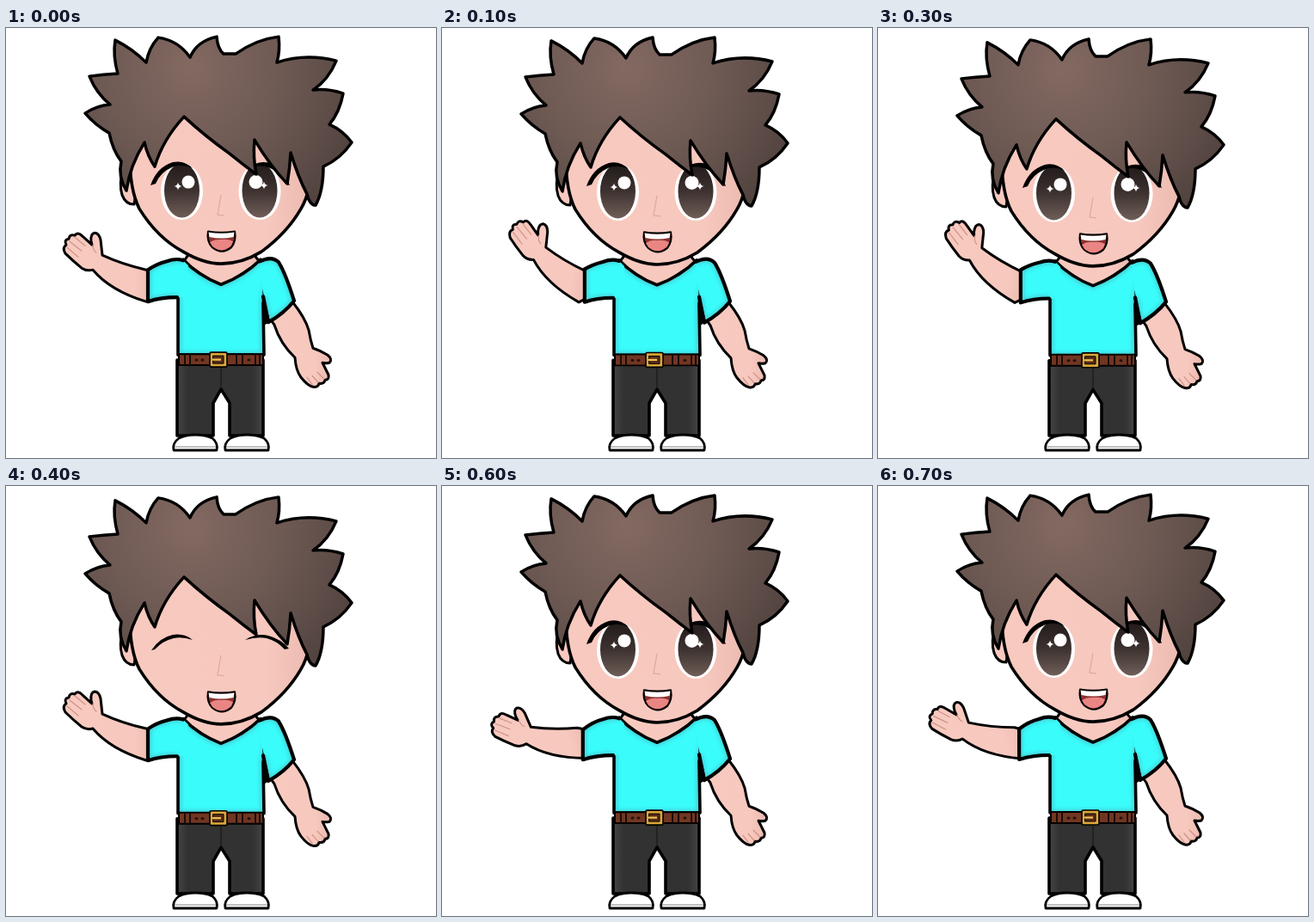
An HTML page that plays this animation: 500x500 px, repeating every 0.8 s.

```html
<!DOCTYPE html>
<html lang="en">
<head>
<meta charset="utf-8">
<title>Waving boy</title>
<style>
  html, body { margin: 0; width: 100%; height: 100%; overflow: hidden; background: #fff; }
  svg { display: block; width: 100vw; height: 100vh; }
  .line { stroke: #000; stroke-linejoin: round; stroke-linecap: round; }
  .skin { fill: url(#skin); stroke-width: 3; }
  .crease { fill: none; stroke: #cf9388; stroke-width: 1.2; stroke-linecap: round; }
  .cloth { fill: #3afcfb; }
  .shade { fill: none; stroke: #4cc3cb; stroke-width: 8; opacity: .75; filter: url(#soft); }
</style>
</head>
<body>
<svg viewBox="0 0 500 500">
  <defs>
    <filter id="soft" x="-20%" y="-20%" width="140%" height="140%">
      <feGaussianBlur stdDeviation="2.2"/>
    </filter>
    <linearGradient id="skin" x1="0" y1="0" x2="1" y2="0">
      <stop offset="0" stop-color="#f8c9bf"/>
      <stop offset=".75" stop-color="#f7c8be"/>
      <stop offset="1" stop-color="#eab9af"/>
    </linearGradient>
    <radialGradient id="hair" gradientUnits="userSpaceOnUse" cx="215" cy="45" r="230">
      <stop offset="0" stop-color="#836962"/>
      <stop offset=".5" stop-color="#6c5852"/>
      <stop offset="1" stop-color="#4d3f3c"/>
    </radialGradient>
    <linearGradient id="iris" x1="0" y1="0" x2="0" y2="1">
      <stop offset="0" stop-color="#211b1a"/>
      <stop offset=".5" stop-color="#3d3230"/>
      <stop offset="1" stop-color="#705e58"/>
    </linearGradient>
    <linearGradient id="denim" x1="0" y1="0" x2="1" y2="0">
      <stop offset="0" stop-color="#454545"/>
      <stop offset=".12" stop-color="#323232"/>
      <stop offset=".88" stop-color="#323232"/>
      <stop offset="1" stop-color="#454545"/>
    </linearGradient>
    <path id="torso" d="M206 269Q224 288 250 298Q277 288 296 269L307 282L299 320L300 380H200V313L192 283Z"/>
    <path id="cuff" d="M295 271Q309 264 317 272Q325 285 335 317Q323 332 305 342L299 312Z"/>
    <clipPath id="inTorso"><use href="#torso"/></clipPath>
    <clipPath id="inCuff"><use href="#cuff"/></clipPath>
    <clipPath id="inSleeve"><path id="sleeveClip"/></clipPath>
    <g id="eye">
      <ellipse rx="24.500" ry="33" cy="1" fill="#fff"/>
      <ellipse rx="20.500" ry="31.500" fill="url(#iris)"/>
    </g>
    <path id="spark" d="M0-4.500Q.6-.6 4.500 0Q.6.6 0 4.500Q-.6.6-4.500 0Q-.6-.6 0-4.500Z" fill="#fff"/>
    <g id="shoe">
      <path class="line" d="M195 491Q193 483 201 477Q208 473 220 473Q233 473 240 477Q247 483 245 491Z" fill="#fff" stroke-width="2.800"/>
      <path d="M196 487H244" fill="none" stroke="#888" stroke-width="1.200"/>
    </g>
  </defs>

  <g id="restArm">
    <path class="line skin" d="M305 335L333 318Q348 337 352 351Q354 363 357 372Q366 375 374 380Q380 385 376 389Q372 390 368 389L375 403Q376 409 371 409Q370 414 364 413Q363 418 357 417Q351 416 343 406Q337 398 336 383Q319 367 312 345Z"/>
    <path class="crease" d="M362 400L370 408M356 404L363 412M350 406L356 414"/>
  </g>

  <g id="waveArm">
    <path class="line skin" d="M176 288L163 281Q136 275 112 264L110 246Q108 238 103 238Q98 239 99 248L100 252L89 242Q83 236 80 241Q74 239 73 245Q67 246 70 252Q65 255 69 262Q77 270 88 279Q94 283 101 281Q121 305 163 318L174 309Z"/>
    <path class="crease" d="M80 243L92 253M74 248L88 259M71 255L84 266M101 252Q101 258 105 261"/>
  </g>

  <g id="body">
    <path class="line" d="M199 386H299V474H260V436L250 420L241 436V474H199Z" fill="url(#denim)" stroke-width="3.600"/>
    <path d="M250 395V418" fill="none" stroke="#181818" stroke-width="1.200"/>
    <path class="line skin" d="M213 255Q213 267 205 271L250 302L296 271Q287 266 288 255Z"/>
    <use href="#torso" class="cloth"/>
    <g clip-path="url(#inTorso)"><use href="#torso" class="shade"/></g>
    <use href="#torso" class="line" fill="none" stroke-width="3.600"/>
    <g>
      <rect class="line" x="201" y="379" width="98" height="13" fill="#713622" stroke-width="2"/>
      <path d="M208 379V392M214 379V392M268 379V392M275 379V392M290 379V392M295 379V392" stroke="#1b0b07" stroke-width="2"/>
      <path d="M221 386H222M228 386H229M282 386H283" stroke="#24100a" stroke-width="3" stroke-linecap="round"/>
      <rect class="line" x="237" y="377" width="20" height="17" rx="1.500" fill="#dba538" stroke-width="1.600"/>
      <rect class="line" x="241" y="381" width="12" height="9" fill="#5a2a1b" stroke-width="1"/>
      <path d="M240 385.500H250" stroke="#f0c455" stroke-width="2.200"/>
    </g>
    <use href="#cuff" class="cloth"/>
    <g clip-path="url(#inCuff)">
      <path class="shade" d="M295 271Q309 264 317 272Q325 285 335 317Q323 332 305 342L299 312"/>
    </g>
    <path class="line" d="M295 271Q309 264 317 272Q325 285 335 317Q323 332 305 342L299 312" fill="none" stroke-width="4.200"/>
    <path d="M298 303L307 341L301 345Z"/>
    <path id="sleeveFill" class="cloth"/>
    <g clip-path="url(#inSleeve)"><path id="sleeveShade" class="shade"/></g>
    <path id="sleeve" class="line" fill="none" stroke-width="4.200"/>
  </g>

  <use href="#shoe"/>
  <use href="#shoe" x="60"/>

  <g id="head">
    <path class="line skin" d="M136 165Q131 181 135 194Q139 205 149 205L155 165Z"/>
    <path class="line skin" d="M144 150Q144 188 155 210Q176 244 206 260Q230 274 250 274Q274 274 297 260Q327 238 343 210Q355 190 357 150L300 95H190Z" style="stroke-width:3.600"/>
    <path d="M250 194L246 217L254 218" fill="none" stroke="#dfaaa0" stroke-width="1.300"/>
    <path class="line" d="M235 236.500Q250 239 266 236.500Q268 247 262 255Q251 264 240 255Q233 248 235 236.500Z" fill="#8b312f" stroke-width="2.200"/>
    <path d="M237 249Q243 245 250 246Q258 245 264 248L262 253Q251 263 240 254Z" fill="#e98583"/>
    <path d="M235.500 237.500Q250 240 265.500 237.500L264.500 243Q250 246 236.500 243Z" fill="#fff"/>

    <g id="open">
      <use href="#eye" x="204.500" y="189"/>
      <use href="#eye" x="295" y="189"/>
      <circle cx="212" cy="179" r="7.500" fill="#fff"/>
      <circle cx="290.500" cy="179" r="8" fill="#fff"/>
      <use href="#spark" x="200" y="184"/>
      <use href="#spark" x="300" y="183"/>
      <path d="M168 183Q175 162 194 156Q207 153 217 163Q204 157 193 162Q180 167 174 181Z"/>
      <path d="M282 163Q293 153 307 157Q324 164 330 183L325 181Q319 167 305 162Q294 158 282 163Z"/>
    </g>
    <g id="shut">
      <path d="M169 188Q179 173 194 170Q207 168 217 176Q205 172 195 174Q182 177 173 187Z"/>
      <path d="M278 176Q291 168 305 171Q320 175 329 186L324 187Q315 177 303 174Q292 172 278 176Z"/>
    </g>

    <path class="line" fill="url(#hair)" stroke-width="3.500" d="M140 189Q130 173 134 155Q124 142 120 122Q104 113 92 99Q106 90 121 89Q105 76 97 56Q113 54 130 53Q124 32 127 14Q147 24 163 40Q166 23 177 11Q200 14 214 34Q222 15 245 10Q246 24 253 30L267 30Q291 13 317 10Q319 26 315 40Q348 29 384 38Q375 60 357 72Q374 70 392 76Q388 98 376 112Q392 119 402 133Q389 152 369 161Q369 190 360 206Q353 206 350 193Q340 174 331 145Q330 164 327 181Q307 160 289 130Q287 150 291 170Q276 159 260 146Q232 126 207 103Q182 130 173 161Q165 150 161 133Q144 160 140 189Z"/>
  </g>
</svg>
<script>
  const $ = id => document.getElementById(id);
  const LOOP = 800, STEP = 100, BLINK = 4;
  const put = (id, value) => $(id).setAttribute("transform", value);
  const draw = (id, d) => $(id).setAttribute("d", d);

  // One smooth cycle per loop, from -1 to 1, highest at the given step.
  const wave = (i, peak) => Math.cos(2 * Math.PI * (i - peak) * STEP / LOOP);

  function pose(i) {
    const angle = 17.5 * wave(i, 2);
    const nod = 1.5 + 1.5 * wave(i, 3.5);
    const dip = 1 + wave(i, 3);
    const squash = 1 - dip * .0045;

    put("head", `translate(0 ${nod})`);
    put("body", `translate(0 ${475 * (1 - squash)}) scale(1 ${squash})`);
    put("restArm", `translate(0 ${dip * .8})`);
    put("waveArm", `translate(0 ${dip * .6}) rotate(${angle} 160 300)`);

    const x = 165 + angle * .07;
    const y = 281 - angle * .12;
    const edge = `M206 270Q198 267 187 271Q175 274 ${x} ${y}L${x} 318Q180 313 199 313`;
    const patch = edge + "L208 313L212 276Z";
    draw("sleeve", edge);
    draw("sleeveShade", edge);
    draw("sleeveFill", patch);
    draw("sleeveClip", patch);

    $("open").style.display = i === BLINK ? "none" : "";
    $("shut").style.display = i === BLINK ? "" : "none";
  }

  const start = performance.now();
  function tick(now) {
    const t = Math.max(0, now - start) % LOOP;
    pose(Math.floor(t / STEP));
    requestAnimationFrame(tick);
  }
  pose(0);
  requestAnimationFrame(tick);
</script>
</body>
</html>
```
